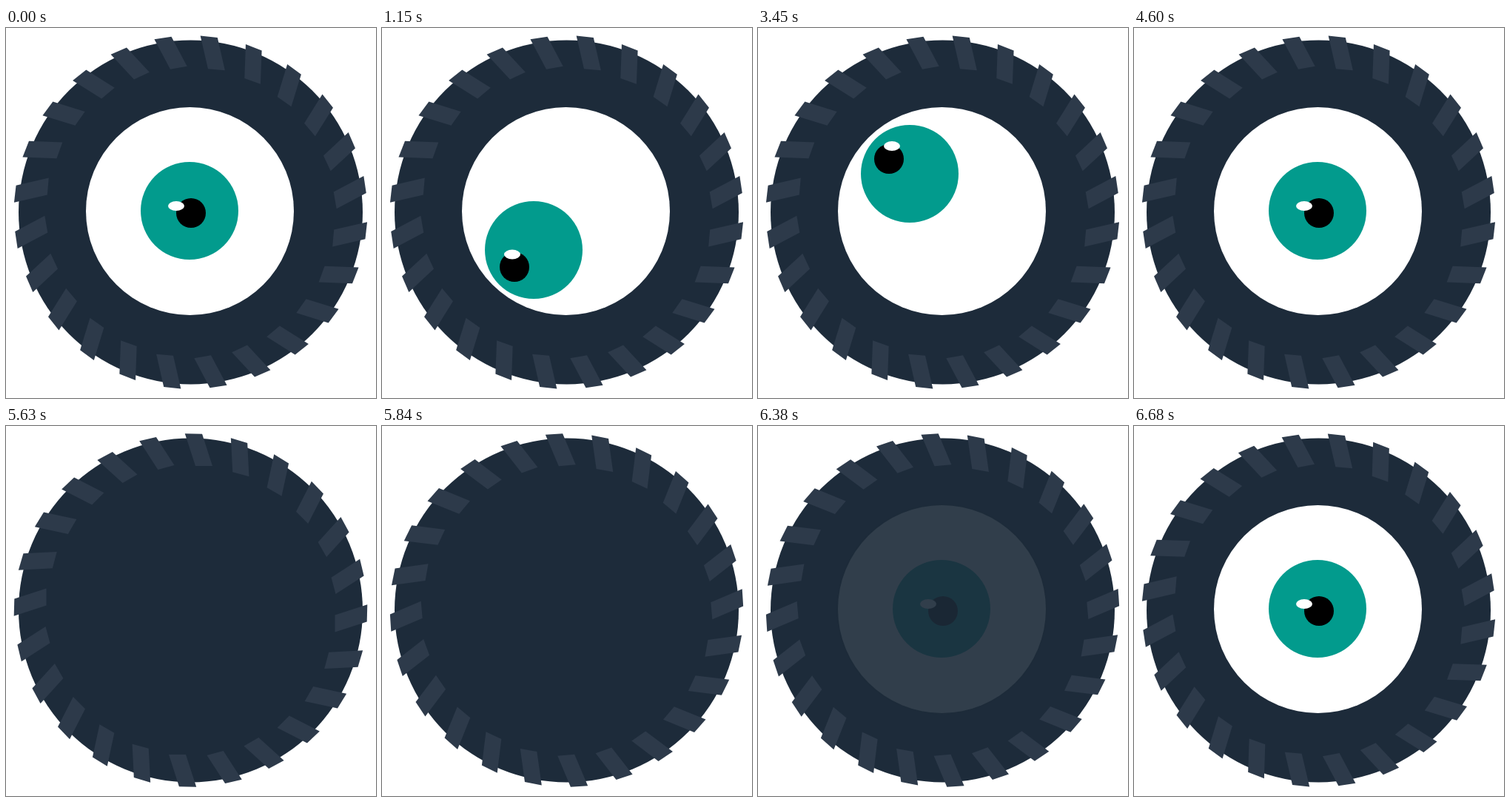
An HTML page with a canvas for the animation above (7.61 s loop, 500x500 px).

```html
<!DOCTYPE html>
<html lang="en">
<head>
<meta charset="utf-8">
<title>Wheel eye</title>
<style>
  html, body { margin: 0; width: 100%; height: 100%; overflow: hidden; background: #fff; }
  canvas { display: block; width: 500px; height: 500px; }
</style>
</head>
<body>
<canvas id="stage" width="500" height="500"></canvas>
<script>
const ctx = document.getElementById('stage').getContext('2d');
const LOOP = 7610, TICK = 30, TREADS = 24;
const SPIN_START = 5600, SPIN_STEPS = 36;
const FADE_START = 6380, FADE_STEPS = 11;
const CENTER = [249.5, 249];
const TYRE = '#1d2b3a';
const TREAD = [[-7.7, -238.8], [15.6, -238.2], [29.5, -195], [6.5, -195]];

// Each pose: iris x, y, pupil x, y, glint x, y
const POSES = {
  middle:     [248, 247, 250, 250, 230, 240.5],
  lowerLeft:  [205, 300, 179, 323, 176, 306],
  lowerRight: [286, 310, 308, 333, 290, 317.5],
  upperLeft:  [205, 197, 177, 177, 181, 159.5]
};
const GLANCES = [
  [1000, POSES.middle, POSES.lowerLeft],
  [2150, POSES.lowerLeft, POSES.lowerRight],
  [3300, POSES.lowerRight, POSES.upperLeft],
  [4450, POSES.upperLeft, POSES.middle]
];

// Share of a stepped move done at time t; the first step lands on start
function progress(t, start, steps) {
  const done = Math.floor((t - start) / TICK) + 1;
  return Math.max(0, Math.min(1, done / steps));
}

function oval(x, y, rx, ry, color) {
  ctx.fillStyle = color;
  ctx.beginPath();
  ctx.ellipse(x, y, rx, ry, 0, 0, Math.PI * 2);
  ctx.fill();
}

function poseAt(t) {
  let pose = POSES.middle;
  for (const [start, from, to] of GLANCES) {
    if (t < start) break;
    const p = progress(t, start, 6);
    pose = from.map((v, i) => v + (to[i] - v) * p);
  }
  return pose;
}

function eyeAlpha(t) {
  return t < SPIN_START ? 1 : progress(t, FADE_START, FADE_STEPS);
}

function drawWheel(degrees) {
  oval(...CENTER, 232.5, 232.5, TYRE);
  ctx.fillStyle = '#2d3a4a';
  ctx.save();
  ctx.translate(...CENTER);
  ctx.rotate((degrees - 10) * Math.PI / 180);
  for (let i = 0; i < TREADS; i++) {
    ctx.beginPath();
    TREAD.forEach(([x, y]) => ctx.lineTo(x, y));
    ctx.fill();
    ctx.rotate(Math.PI * 2 / TREADS);
  }
  ctx.restore();
}

function drawEye([ix, iy, px, py, gx, gy], alpha) {
  if (alpha === 0) return;
  oval(248.5, 247.5, 140.5, 140.5, '#fff');
  oval(ix, iy, 66, 66, '#029b8d');
  oval(px, py, 20, 20, '#000');
  oval(gx, gy, 11, 6.5, '#fff');
  // Fade the eye as one group by veiling it in tyre colour
  ctx.globalAlpha = 1 - alpha;
  oval(248.5, 247.5, 142, 142, TYRE);
  ctx.globalAlpha = 1;
}

function draw(t) {
  ctx.fillStyle = '#fff';
  ctx.fillRect(0, 0, 500, 500);
  drawWheel(progress(t, SPIN_START + TICK, SPIN_STEPS) * 359.8);
  drawEye(poseAt(t), eyeAlpha(t));
}

const begin = performance.now();
function frame() {
  draw((performance.now() - begin) % LOOP);
  requestAnimationFrame(frame);
}
frame();
</script>
</body>
</html>
```
